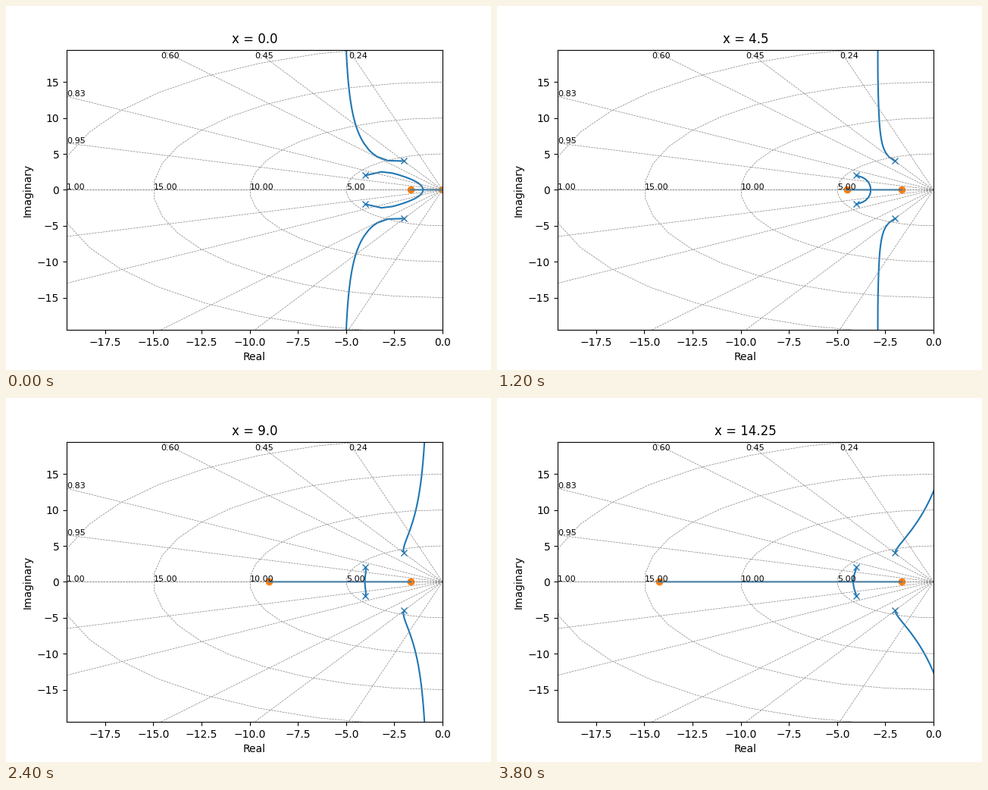
Animation, 640 px wide and 480 px high, one loop 4000 ms. Source, as a matplotlib script:

```python
import numpy as np
import matplotlib.pyplot as plt
from matplotlib.animation import FuncAnimation

FRAMES, INTERVAL, STEP = 20, 200, 0.75
LIM = 19.5
ZERO = 1.65
DEN = np.poly1d([1, 4, 20]) * np.poly1d([1, 8, 20])


def track(rows):
    """Reorder each row of roots so that every column follows one branch."""
    out = np.array(rows, dtype=complex)
    for n in range(1, len(out)):
        prev, row = out[n - 1], out[n].copy()
        free = list(range(len(prev)))
        for root in row:
            k = free.pop(int(np.abs(root - prev[free]).argmin()))
            out[n, k] = root
    return out


def closed_loop(num, gains):
    return np.array([np.sort((DEN + k * num).r.astype(complex)) for k in gains])


def break_points(num):
    pts = (DEN.deriv() * num - num.deriv() * DEN).r.astype(complex)
    pts = pts[num(pts) != 0]
    gains = -DEN(pts) / num(pts)
    keep = gains.real >= 0
    return gains[keep].real, pts[keep]


def max_gain(num, gains, pts):
    center = (DEN.r.sum() - num.r.sum()).real / 2
    marks = np.concatenate((num.r, DEN.r, pts))
    far = center + 4 * np.abs(marks - center).max() * np.array([-1j, 1j])
    return max(np.abs(DEN(far) / num(far)).max(), gains.max(initial=1))


def locus(x):
    num = np.poly1d([1, x]) * np.poly1d([1, ZERO])
    gains, pts = break_points(num)
    top = max_gain(num, gains, pts)
    ks = np.sort(np.hstack((np.linspace(0, top, 50), gains)))
    tol = 0.05 * LIM
    while True:
        roots = track(closed_loop(num, ks))
        wide = np.where((np.abs(np.diff(roots, axis=0)) > tol).any(axis=1))[0]
        if not len(wide) or len(ks) > 1500:
            break
        extra = [np.linspace(ks[i], ks[i + 1], 5)[1:4] for i in wide]
        ks = np.sort(np.hstack([ks] + extra))
    tail = closed_loop(num, ks[-1] * np.array([10, 100, 1000]))
    return track(np.vstack((roots, tail)))


def draw_grid(ax):
    style = dict(color="gray", linestyle="dashed", linewidth=0.5)

    def label(value, x, y):
        ax.annotate(f"{value:.2f}", xy=(x, y), textcoords="data", fontsize=8)

    # constant damping
    for slope in (4, 2, 4 / 3, 2 / 3, 1 / 3, 0):
        for sign in (1, -1):
            ax.plot([0, -LIM], [0, sign * slope * LIM], **style)
        zeta = 1 / np.hypot(1, slope)
        if slope > 1:
            label(zeta, -LIM / slope, 0.94 * LIM)
        else:
            label(zeta, -LIM, slope * LIM)
    ax.plot([0, 0], [-LIM, LIM], **style)

    # constant natural frequency
    angles = np.radians(np.linspace(-90, 90, 20))
    for wn in (20, 15, 10, 5):
        ax.plot(-wn * np.cos(angles), wn * np.sin(angles), **style)
        if wn < LIM:
            label(wn, -wn, 0)


xs = [STEP * i for i in range(FRAMES)]
loci = [locus(x) for x in xs]

fig, ax = plt.subplots(figsize=(6.4, 4.8), dpi=100)
ax.set_xlim(-LIM, 0)
ax.set_ylim(-LIM, LIM)
ax.set_xlabel("Real")
ax.set_ylabel("Imaginary")
title = ax.set_title("")

ax.plot(DEN.r.real, DEN.r.imag, "x", color="C0")
zeros, = ax.plot([], [], "o", color="C1")
branches = [ax.plot([], [], color="C0")[0] for _ in range(4)]
draw_grid(ax)


def update(i):
    title.set_text(f"x = {xs[i]}")
    zeros.set_data([-xs[i], -ZERO], [0, 0])
    for line, col in zip(branches, loci[i].T):
        line.set_data(col.real, col.imag)
    return [title, zeros, *branches]


anim = FuncAnimation(fig, update, frames=FRAMES, init_func=lambda: update(0),
                     interval=INTERVAL, repeat=True, repeat_delay=0)
plt.show()
```
